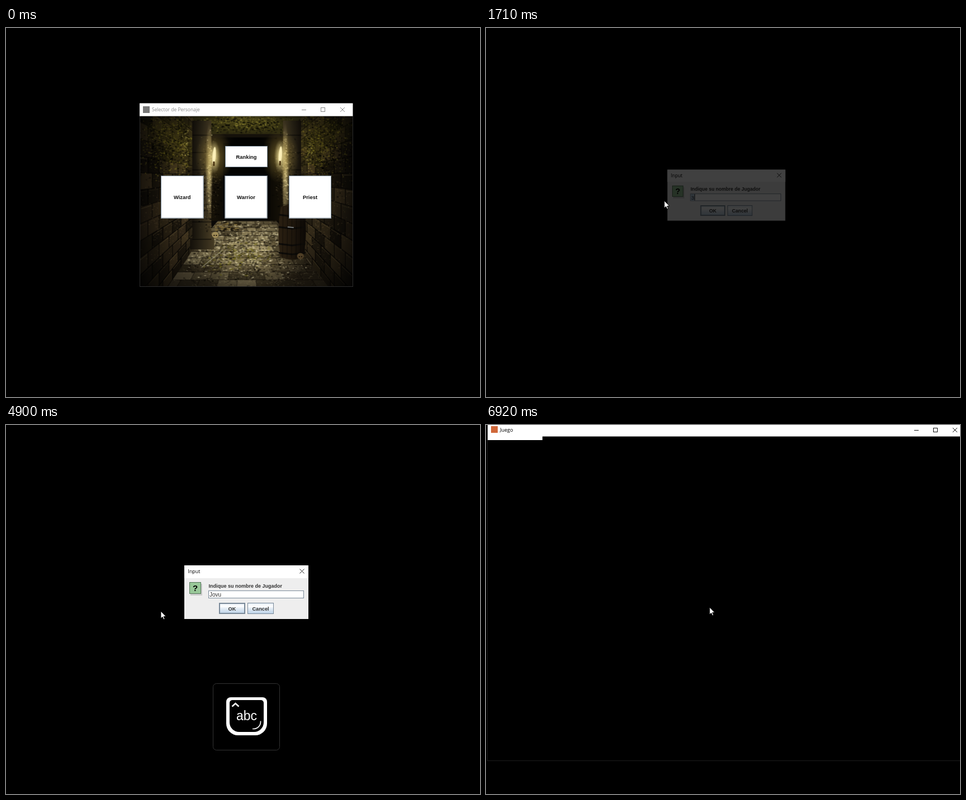
Recreate the animation shown at these times as an HTML page with a canvas. Size 848x660 px, loop 8000 ms.

```html
<!DOCTYPE html>
<html lang="es">
<head>
<meta charset="utf-8">
<title>Selector de Personaje</title>
<style>
html, body { margin: 0; width: 100%; height: 100%; overflow: hidden; background: #000; }
canvas { display: block; }
</style>
</head>
<body>
<canvas id="stage" width="848" height="660"></canvas>
<script>
const LOOP = 8000, TICK = 69;
const SANS = '"Liberation Sans", Arial, sans-serif';
const UI = '"Open Sans", "Noto Sans", sans-serif';
const PLAYER = 'Jovu';
const TYPED_AT = [2920, 3450, 3850, 3980];
const STEEL = '#7a8a99', SKY = '#b8cfe5';
const ctx = document.getElementById('stage').getContext('2d');

function rect(c, x, y, w, h, fill) {
  c.fillStyle = fill;
  c.fillRect(x, y, w, h);
}

function frame(x, y, w, h, color, weight = 1) {
  ctx.strokeStyle = color;
  ctx.lineWidth = weight;
  ctx.strokeRect(x + weight / 2, y + weight / 2, w - weight, h - weight);
}

function poly(c, pts, fill) {
  c.beginPath();
  pts.forEach(([x, y]) => c.lineTo(x, y));
  c.closePath();
  c.fillStyle = fill;
  c.fill();
}

function line(c, pts, color, weight = 1) {
  c.beginPath();
  pts.forEach(([x, y]) => c.lineTo(x, y));
  c.strokeStyle = color;
  c.lineWidth = weight;
  c.stroke();
}

function text(str, x, y, font, color = '#000', align = 'left') {
  ctx.font = font;
  ctx.fillStyle = color;
  ctx.textAlign = align;
  ctx.fillText(str, x, y);
}

// Linear interpolation through rows of [time, value, value...].
function track(rows, t) {
  const i = rows.findIndex(r => r[0] > t);
  if (i === 0) return rows[0].slice(1);
  if (i < 0) return rows[rows.length - 1].slice(1);
  const a = rows[i - 1], b = rows[i], k = (t - a[0]) / (b[0] - a[0]);
  return a.slice(1).map((v, j) => v + (b[j + 1] - v) * k);
}

function snap(t) {
  const base = [6290, 5460, 4692, 1360, 200, 0].find(b => t >= b);
  return base + Math.floor((t - base) / TICK) * TICK;
}

function makeDungeon() {
  const cv = document.createElement('canvas');
  cv.width = 381;
  cv.height = 304;
  const c = cv.getContext('2d');
  let seed = 7;
  const rnd = () => (seed = seed * 16807 % 2147483647) / 2147483647;
  const glow = (x, y, rx, ry, rgb, a) => {
    c.save();
    c.translate(x, y);
    c.scale(rx, ry);
    const g = c.createRadialGradient(0, 0, 0, 0, 0, 1);
    g.addColorStop(0, `rgba(${rgb},${a})`);
    g.addColorStop(1, `rgba(${rgb},0)`);
    rect(c, -1, -1, 2, 2, g);
    c.restore();
  };
  const shade = (x0, x1, stops) => {
    const g = c.createLinearGradient(x0, 0, x1, 0);
    stops.forEach((s, i) => g.addColorStop(i / (stops.length - 1), s));
    return g;
  };
  // irregular specks scattered around a point
  const scatter = (n, x, y, rx, ry, rgb, a, size) => {
    for (let i = 0; i < n; i++) {
      const dx = rnd() + rnd() - 1, dy = rnd() + rnd() - 1;
      rect(c, x + dx * rx, y + dy * ry, 1 + rnd() * size, 1 + rnd() * size * 0.5, `rgba(${rgb},${rnd() * a})`);
    }
  };
  c.translate(-239, -158);
  rect(c, 239, 158, 381, 304, '#0b0906');

  // side walls, laid out from the vanishing point
  for (const s of [-1, 1]) {
    const at = (d, v) => [430 + s * d, 265 + v * d];
    const wall = [at(95, -1.15), at(191, -1.15), at(191, 1.39), at(95, 1.39)];
    poly(c, wall, shade(430 + s * 191, 430 + s * 95, ['#110e09', '#2a2214', '#2b2416']));
    for (let r = 0; r < 16; r++) {
      const v = -1.15 + r * 0.16;
      for (let d = 95 + (r % 2) * 8; d < 191; d += 13 + (d - 95) / 9) {
        const e = d + 13 + (d - 95) / 9;
        const stone = [at(d, v), at(e, v), at(e, v + 0.16), at(d, v + 0.16)];
        const light = rnd() < 0.5;
        poly(c, stone, `rgba(${light ? '88,70,42' : '0,0,0'},${rnd() * 0.42})`);
        line(c, [at(d, v), at(d, v + 0.16)], 'rgba(0,0,0,.6)', 1.4);
        line(c, [at(d + 1.5, v + 0.02), at(e - 1.5, v + 0.02)], `rgba(150,128,82,${rnd() * 0.4})`);
      }
      line(c, [at(95, v), at(191, v)], 'rgba(0,0,0,.65)', 1.4);
    }
    glow(430 + s * 120, 205, 52, 68, '95,86,18', 0.42);
    glow(430 + s * 160, 180, 42, 36, '80,74,14', 0.3);
    scatter(650, 430 + s * 132, 205, 62, 78, '150,140,38', 0.55, 2.5);
    scatter(650, 430 + s * 140, 215, 65, 95, '0,0,0', 0.75, 3);
    scatter(60, 430 + s * 111, 215, 8, 48, '205,190,95', 0.6, 2);
    scatter(450, 430 + s * 135, 345, 65, 110, '125,105,70', 0.35, 2);
  }

  // floor
  c.save();
  c.beginPath();
  [[380, 344], [482, 344], [525, 395], [575, 462], [290, 462], [335, 395]].forEach(p => c.lineTo(...p));
  c.clip();
  rect(c, 239, 340, 381, 122, '#30291b');
  glow(430, 392, 120, 78, '190,172,118', 0.72);
  for (let i = 0, y = 346; y < 462; i++) {
    const next = y + 5 + i * 0.9, k = (next - 265) / (y - 265);
    const half = (y - 265) * 0.9;
    for (let j = -5; j < 6; j++) {
      const x = (j + (i % 2) / 2) * half / 5, w = half / 5;
      const stone = [[430 + x, y], [430 + x + w, y], [430 + (x + w) * k, next], [430 + x * k, next]];
      poly(c, stone, `rgba(${rnd() < 0.45 ? '215,200,150' : '16,12,5'},${rnd() * 0.32})`);
      line(c, [stone[0], stone[3]], 'rgba(12,9,4,.5)', 1.2);
    }
    line(c, [[430 - half, y], [430 + half, y]], 'rgba(12,9,4,.55)', 1.2);
    y = next;
  }
  scatter(900, 430, 395, 110, 58, '248,236,190', 0.5, 4);
  scatter(1100, 430, 405, 150, 68, '12,9,3', 0.6, 4);
  scatter(220, 410, 410, 75, 32, '105,98,18', 0.6, 5);
  scatter(700, 430, 440, 150, 40, '140,130,95', 0.4, 2);
  c.restore();

  // passage and ceiling
  poly(c, [[330, 158], [530, 158], [495, 194], [367, 194]], '#29260f');
  glow(430, 168, 100, 26, '120,110,34', 0.5);
  scatter(420, 430, 170, 92, 16, '165,155,60', 0.5, 3);
  scatter(380, 430, 174, 100, 18, '0,0,0', 0.7, 4);
  rect(c, 367, 190, 128, 10, '#15110a');
  rect(c, 367, 196, 128, 149, shade(367, 495, ['#171208', '#030302', '#020201', '#171208']));
  rect(c, 388, 206, 84, 132, '#030302');

  // pillars
  const stone = ['#14100a', '#2b2517', '#463b24'];
  rect(c, 333, 166, 34, 222, shade(333, 367, stone));
  rect(c, 329, 376, 43, 20, shade(329, 372, stone));
  rect(c, 495, 166, 32, 190, shade(527, 495, stone));
  for (let y = 192; y < 380; y += 31) {
    line(c, [[333, y], [367, y]], 'rgba(0,0,0,.6)', 1.5);
    line(c, [[495, y], [527, y]], 'rgba(0,0,0,.6)', 1.5);
  }
  for (const [x, bottom] of [[363, 372], [499, 325]]) {
    const mid = (186 + bottom) / 2;
    scatter(260, x, mid, 22, bottom - mid, '150,132,85', 0.4, 2);
    scatter(220, x, mid, 26, bottom - mid, '0,0,0', 0.7, 3);
    glow(x, 255, 7, 85, '225,205,135', 0.75);
    scatter(90, x, 255, 5, 80, '245,230,170', 0.75, 2);
  }

  // barrel
  c.beginPath();
  c.moveTo(491, 320);
  c.quadraticCurveTo(483, 365, 490, 409);
  c.quadraticCurveTo(511, 420, 531, 409);
  c.quadraticCurveTo(540, 365, 532, 320);
  c.quadraticCurveTo(511, 312, 491, 320);
  c.fillStyle = shade(486, 537, ['#2b2012', '#1f170d', '#0b0805']);
  c.fill();
  for (const y of [334, 356, 386, 402]) line(c, [[487, y], [511, y + 3], [535, y]], '#0d0b08', 3);
  for (let x = 495; x < 534; x += 8) line(c, [[x, 320], [x - 1, 411]], 'rgba(0,0,0,.45)');
  line(c, [[503, 356], [514, 357]], '#8f969a', 1.5);

  // rubble, skulls, stick
  for (let i = 0; i < 60; i++) {
    rect(c, 372 + rnd() * 42, 347 + rnd() * 15, 2 + rnd() * 5, 2, ['#5a4b2b', '#1a150b', '#7a6838'][i % 3]);
  }
  for (const [x, y] of [[374, 370], [526, 408]]) {
    c.beginPath();
    c.ellipse(x, y, 6, 5.5, 0, 0, 7);
    c.fillStyle = x < 400 ? '#a18d58' : '#57452a';
    c.fill();
    rect(c, x - 3, y, 2, 2, '#1a1208');
    rect(c, x + 1, y, 2, 2, '#1a1208');
  }
  line(c, [[350, 428], [386, 398]], '#8b866a', 1.5);

  // torches
  for (const [x, y] of [[372, 231], [490, 230]]) {
    glow(x, y, 34, 48, '190,160,70', 0.5);
    glow(x, y, 11, 30, '255,238,165', 0.9);
    c.beginPath();
    c.ellipse(x, y - 2, 3, 16, 0.08, 0, 7);
    c.fillStyle = '#fdf0b8';
    c.fill();
    rect(c, x - 2, y + 8, 3, 8, '#4b3512');
  }

  const edge = c.createRadialGradient(430, 300, 130, 430, 300, 255);
  edge.addColorStop(0, 'rgba(0,0,0,0)');
  edge.addColorStop(1, 'rgba(0,0,0,.8)');
  rect(c, 239, 158, 381, 304, edge);
  return cv;
}

const dungeon = makeDungeon();

// Draws scaled around (cx, cy); darkening equals fading on the black desktop.
function faded(alpha, scale, cx, cy, box, draw) {
  if (alpha <= 0) return;
  ctx.save();
  ctx.translate(cx, cy);
  ctx.scale(scale, scale);
  ctx.translate(-cx, -cy);
  draw();
  if (alpha < 1) rect(ctx, ...box, `rgba(0,0,0,${1 - alpha})`);
  ctx.restore();
}

function cross(x, y, size, color) {
  line(ctx, [[x, y], [x + size, y + size]], color);
  line(ctx, [[x + size, y], [x, y + size]], color);
}

function windowButtons(x, y, color) {
  line(ctx, [[x, y + 4.5], [x + 8, y + 4.5]], color);
  frame(x + 34, y, 8, 8, color);
  cross(x + 69, y, 8, color);
}

function choice(label, x, y, w, h, hover, pressed) {
  rect(ctx, x, y, w, h, pressed ? SKY : '#fff');
  frame(x, y, w, h, STEEL);
  if (hover) frame(x + 1, y + 1, w - 2, h - 2, pressed ? '#a3b8cc' : SKY, 2);
  text(label, x + w / 2, y + h / 2 + 3.8, 'bold 9.4px ' + SANS, '#111', 'center');
}

function selector(t, hover) {
  const active = t >= 1360;
  rect(ctx, 239, 134.6, 382, 328.4, '#2b2b2b');
  rect(ctx, 239, 134.6, 381.4, 23, '#fff');
  ctx.drawImage(dungeon, 1, 0, 379, 304, 240, 157.6, 380, 304.4);
  rect(ctx, 245, 140, 12, 12, '#777');
  text('Selector de Personaje', 261, 149.3, '8.5px ' + UI, active ? '#000' : '#888');
  if (t < 1500) windowButtons(529, 142, active ? '#222' : '#888');
  choice('Ranking', 392, 211, 76, 38);
  choice('Wizard', 277, 264, 76.5, 76.5, hover, active);
  choice('Warrior', 391.5, 264, 76, 76.5);
  choice('Priest', 506, 264, 76, 76.5);
}

function metalButton(label, x, main) {
  const g = ctx.createLinearGradient(0, 318, 0, 338);
  [[0, '#dde8f3'], [0.3, '#fff'], [0.5, '#e6eef6'], [1, SKY]].forEach(s => g.addColorStop(...s));
  rect(ctx, x, 318, 47, 20, g);
  frame(x, 318, 47, 20, STEEL, main ? 2 : 1);
  text(label, x + 23.5, 331.5, 'bold 9.2px ' + SANS, '#333', 'center');
}

function dialog(t) {
  rect(ctx, 319, 251, 222, 96, '#eee');
  rect(ctx, 319, 251, 222, 23, '#fff');
  text('Input', 325.5, 265.3, '8.8px ' + UI);
  cross(525.5, 257.5, 8, '#222');

  rect(ctx, 330, 284, 21, 21, '#ccc');
  rect(ctx, 328, 281, 21, 21, '#99c899');
  frame(328, 281, 21, 21, '#55775a');
  text('?', 338.5, 297, 'bold 15px ' + SANS, '#000', 'center');

  text('Indique su nombre de Jugador', 362.5, 291, 'bold 9px ' + SANS, '#333');
  rect(ctx, 362, 296, 171, 14, '#fff');
  frame(362, 296, 171, 14, STEEL);
  const count = TYPED_AT.filter(a => t >= a).length;
  const value = count ? PLAYER.slice(0, count) : '3';
  if (!count) rect(ctx, 363, 297, 7, 12, SKY);
  text(value, 364, 307, '10px ' + SANS, '#333');
  const caretOff = (t >= 2170 && t < 2650) || (t >= 4440 && t < 4940);
  if (!caretOff) {
    rect(ctx, Math.round(364 + ctx.measureText(value).width), 297, 1, 12, '#333');
  }
  metalButton('OK', 381, true);
  metalButton('Cancel', 432);
}

function game() {
  rect(ctx, 2, -20, 860, 621, '#1c1c1c');
  rect(ctx, 3, -20, 858, 620, '#000');
  rect(ctx, 3, -20, 858, 40.5, '#fff');
  rect(ctx, 3, 20, 98, 7, '#fff');
  rect(ctx, 9, 2, 12, 12, '#d0683a');
  text('Juego', 25, 12, '9px ' + UI);
  windowButtons(766, 5, '#111');
}

function round(x, y, w, h, radii) {
  ctx.beginPath();
  ctx.roundRect(x, y, w, h, radii);
}

function keyPanel(t) {
  round(370.5, 462.5, 119, 119, 6);
  ctx.fillStyle = '#000';
  ctx.fill();
  ctx.strokeStyle = '#333';
  ctx.lineWidth = 1;
  ctx.stroke();
  round(394, 487, 73, 68, [8, 8, 21, 21]);
  ctx.fillStyle = '#fff';
  ctx.fill();
  round(400, 492, 61, 57, [5, 5, 17, 17]);
  ctx.fillStyle = '#000';
  ctx.fill();
  line(ctx, [[404.5, 503.5], [410.5, 498], [416.5, 503.5]], '#fff', 2.6);
  ctx.beginPath();
  ctx.moveTo(441, 543.5);
  ctx.bezierCurveTo(450, 544, 456, 538, 455.5, 529.5);
  ctx.lineWidth = 1.6;
  ctx.stroke();
  const shift = t < 2920;
  text(shift ? 'Shift' : 'abc', 430.5, 528, (shift ? 20 : 23) + 'px ' + SANS, '#fff', 'center');
}

const POINTER = [
  [200, 789, 629], [400, 640, 520], [600, 430, 385], [800, 330, 318], [959, 319, 308],
  [1843, 319, 309], [2110, 401, 312],
  [4660, 401, 312], [4770, 350, 322], [4899, 277, 333], [4968, 257, 331],
  [5110, 300, 329], [5313, 400, 326]
];

function pointer(x, y) {
  ctx.save();
  ctx.translate(x, y);
  const shape = [[0, 0], [0, 13], [3, 10.3], [5, 15], [7, 14.1], [5, 9.6], [9, 9.3]];
  poly(ctx, shape, '#fff');
  line(ctx, [...shape, shape[0]], '#000', 0.9);
  ctx.restore();
}

// Rows of [time, opacity, scale].
const SELECTOR = [[1429, 1, 1], [1498, 0.92, 0.995], [1567, 0.45, 0.976], [1636, 0.1, 0.945], [1705, 0, 0.92]];
const DIALOG = [
  [1636, 0, 0.92], [1705, 0.25, 0.95], [1774, 0.75, 0.985], [1843, 0.97, 1], [1912, 1, 1],
  [5460, 1, 1], [5529, 0.8, 0.99], [5598, 0.3, 0.965], [5667, 0, 0.93]
];
const GAME = [[5667, 0, 0.92], [5736, 0.2, 0.94], [5805, 0.6, 0.975], [5874, 0.9, 0.995], [5943, 1, 1]];
const KEYS = [[2581, 0], [2650, 0.6], [2719, 1], [6221, 1], [6911, 0]];

function render(t) {
  const s = snap(t);
  const [px, py] = track(POINTER, s).map(Math.round);
  const hover = t >= 200 && px >= 277 && px < 354 && py >= 264 && py < 341;
  rect(ctx, 0, 0, 848, 660, '#000');
  faded(...track(SELECTOR, s), 429.5, 298.5, [238, 133, 384, 331], () => selector(t, hover));
  faded(...track(DIALOG, s), 430, 299, [318, 250, 224, 98], () => dialog(t));
  faded(...track(GAME, s), 430, 290, [0, -22, 866, 625], game);
  faded(track(KEYS, s)[0], 1, 0, 0, [369, 461, 122, 122], () => keyPanel(t));
  if (t >= 200) pointer(px, py);
}

const start = performance.now();
function tick() {
  render((performance.now() - start) % LOOP);
  requestAnimationFrame(tick);
}
tick();
</script>
</body>
</html>
```
